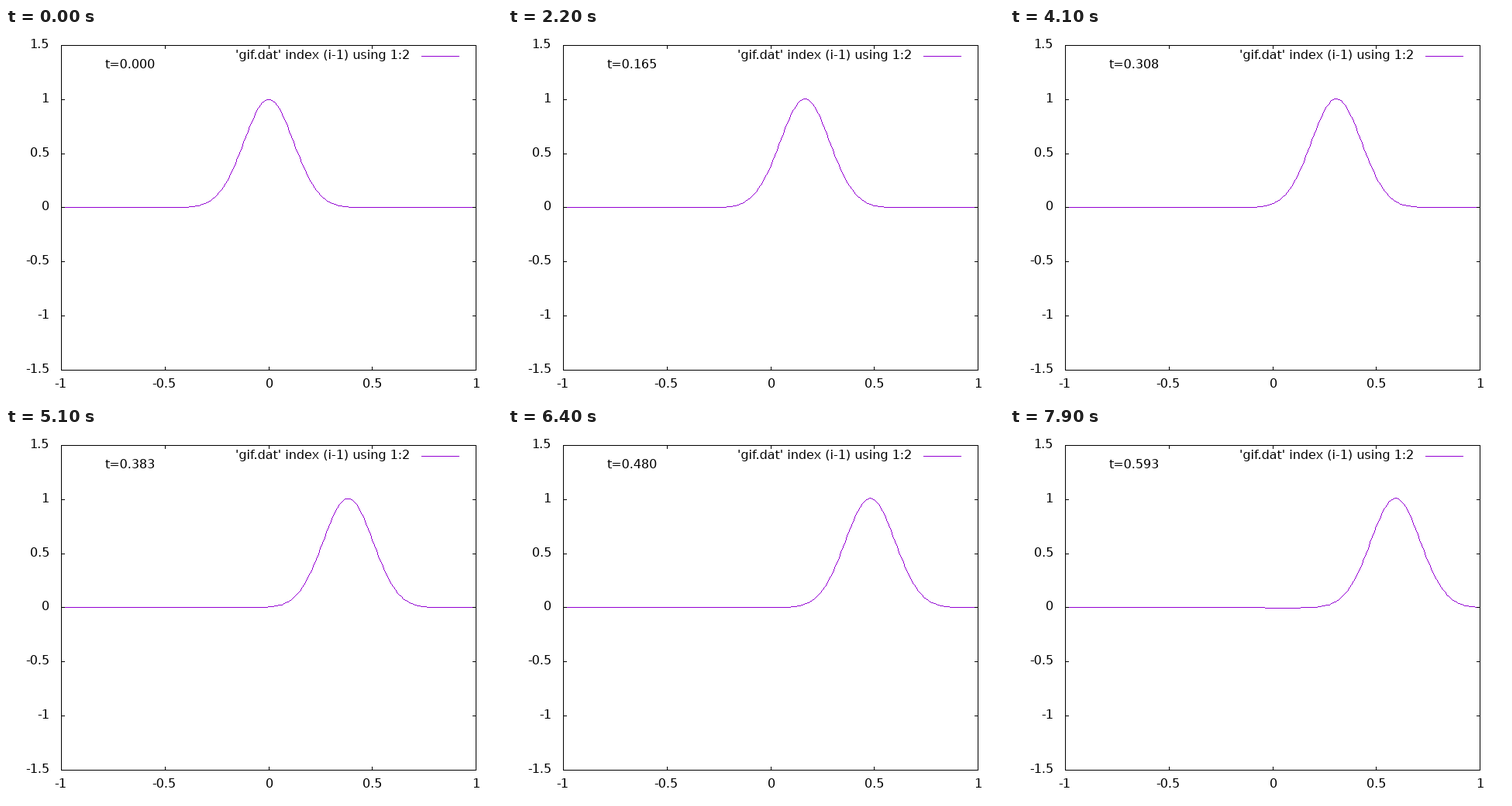
A matplotlib script for the animation above (8 s loop, 640 px wide and 480 px high).

```python
import numpy as np
import matplotlib.pyplot as plt
from matplotlib.animation import FuncAnimation

W, H, DPI = 640, 480, 100
LEFT, RIGHT, TOP, BOTTOM = 71, 606, 22, 441
FRAMES, INTERVAL, DT = 80, 100, 0.0075
SIGMA = 0.12
PURPLE, BLACK = (148, 0, 211), (0, 0, 0)
X_TICKS = np.arange(-1, 1.1, 0.5)
Y_TICKS = np.arange(-1.5, 1.6, 0.5)

plt.rcParams["font.family"] = "DejaVu Sans"
plt.rcParams["text.hinting"] = "default"

fig = plt.figure(figsize=(W / DPI, H / DPI), dpi=DPI, facecolor="white")


def col(x):
    return np.floor(LEFT + (x + 1) * (RIGHT - LEFT) / 2 + 0.5).astype(int)


def row(y):
    up = (y + 1.5) * (BOTTOM - TOP) / 3
    return BOTTOM - np.floor(up + 0.64).astype(int)


def label(x, y, s, ha="left"):
    return fig.text(x / W, 1 - y / H, s, ha=ha, va="baseline",
                    fontsize=16 * 72 / DPI, color="black")


def bearing(s):
    """Blank pixels left of the first glyph."""
    return 2 if s[0] == "1" else 1


def pulse(x, t):
    """Right-moving Gaussian that grows slightly and leaves a faint wake."""
    s = x - t
    peak = (1 + 0.02 * t) * np.exp(-s**2 / (2 * SIGMA**2))
    wake = 0.117 * t**7 * np.exp(-((s + 0.523) / 0.1)**2)
    return peak - wake


def polyline(canvas, xs, ys):
    """One-pixel line without smoothing."""
    for x0, y0, x1, y1 in zip(xs, ys, xs[1:], ys[1:]):
        n = max(abs(x1 - x0), abs(y1 - y0))
        s = np.linspace(0, 1, n + 1)
        px = np.floor(x0 + s * (x1 - x0) + 0.5).astype(int)
        py = np.floor(y0 + s * (y1 - y0) + 0.5).astype(int)
        canvas[py, px] = PURPLE


def draw_frame(canvas):
    canvas[[TOP, BOTTOM], LEFT:RIGHT + 1] = BLACK
    canvas[TOP:BOTTOM + 1, [LEFT, RIGHT]] = BLACK
    for c in col(X_TICKS):
        canvas[TOP:TOP + 5, c] = BLACK
        canvas[BOTTOM - 4:BOTTOM + 1, c] = BLACK
    for r in row(Y_TICKS):
        canvas[r, LEFT:LEFT + 5] = BLACK
        canvas[r, RIGHT - 4:RIGHT + 1] = BLACK


for v in X_TICKS:
    text = f"{v:g}"
    label(col(v) + (2 if v >= 0 else 0) - bearing(text), 464, text, "center")
for v in Y_TICKS:
    text = f"{v:g}"
    label(57 - bearing(text), row(v) + 4, text, "right")
label(296, 40, "'gif.dat' index (i-1) using 1:2")
clock = label(128, 52, "")

grid = np.linspace(-1, 1, 201)
blank = np.full((H, W, 3), 255, np.uint8)
blank[36, 536:585] = PURPLE
picture = fig.figimage(blank, origin="upper")


def update(i):
    t = i * DT
    canvas = blank.copy()
    polyline(canvas, col(grid), row(pulse(grid, t)))
    draw_frame(canvas)
    picture.set_data(canvas)
    clock.set_text(f"t={t + 1e-9:.3f}")
    return picture, clock


anim = FuncAnimation(fig, update, frames=FRAMES, interval=INTERVAL,
                     repeat=True, repeat_delay=0, blit=False)
plt.show()
```
